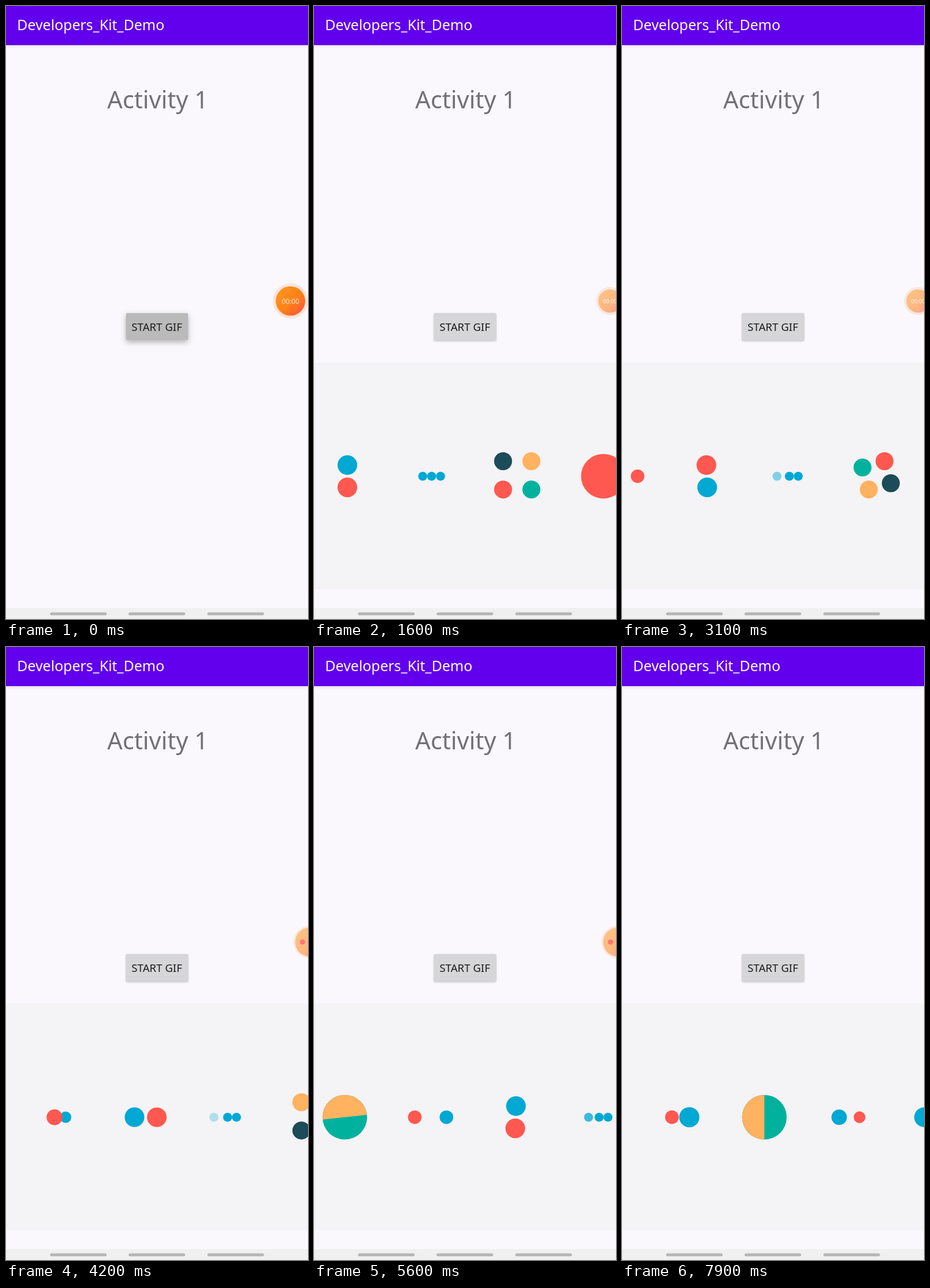
An HTML page with a canvas for the animation above (8000 ms loop, 525 by 1066 pixels).

```html
<!DOCTYPE html>
<html lang="en">
<head>
<meta charset="utf-8">
<title>Activity 1</title>
<style>
  html, body { margin: 0; height: 100%; overflow: hidden; background: #faf8fc; }
  canvas { display: block; width: 100vw; height: 100vh; }
</style>
</head>
<body>
<canvas id="stage" width="525" height="1066"></canvas>
<script>
const ctx = document.getElementById('stage').getContext('2d');
const BLUE = '#00a8d3', RED = '#ff5850', GREEN = '#00b29e', DARK = '#1c4b59', ORANGE = '#ffb260';
const LOOP = 8000, STEP = 100, PITCH = 148.5, MID_Y = 817.7;

// Strip offset over time, and orbit angle / pulse phase over loader cycles
const SCROLL = [[400, -35], [500, -35], [1600, 58], [1700, 58], [3100, 147.4],
                [4200, 242.8], [5600, 350.5], [6600, 430.5], [7900, 544.5]];
const ORBIT = [[.6, 0], [1.246, -250], [1.97, -540], [2.508, -795], [3.276, -1130]];
const PULSE = [[2.508, 180], [3.276, 417]];

const rad = deg => deg * Math.PI / 180;
const clamp = x => Math.min(1, Math.max(0, x));
const frac = x => x - Math.floor(x);
const smooth = x => { x = clamp(x); return x * x * (3 - 2 * x); };
const easeInOut = (x, power) => x < .5 ? (2 * x) ** power / 2 : 1 - (2 - 2 * x) ** power / 2;
const stepped = (x, power) => Math.floor(x) + easeInOut(frac(x), power);

function along(keys, x) {
  if (x <= keys[0][0]) return keys[0][1];
  for (let i = 1; i < keys.length; i++) {
    const [x0, y0] = keys[i - 1], [x1, y1] = keys[i];
    if (x <= x1) return y0 + (y1 - y0) * (x - x0) / (x1 - x0);
  }
  return keys[keys.length - 1][1];
}

function rect(x, y, w, h, color, radius = 0) {
  ctx.fillStyle = color;
  ctx.beginPath();
  ctx.roundRect(x, y, w, h, radius);
  ctx.fill();
}

function disc(x, y, r, color, alpha = 1) {
  if (alpha <= 0) return;
  ctx.globalAlpha = alpha;
  ctx.fillStyle = color;
  ctx.beginPath();
  ctx.arc(x, y, r, 0, 2 * Math.PI);
  ctx.fill();
  ctx.globalAlpha = 1;
}

function text(str, x, y, size, color) {
  ctx.font = `${size}px "Noto Sans", sans-serif`;
  ctx.fillStyle = color;
  ctx.fillText(str, x, y);
}

// Loaders are drawn around (0, 0); c counts their cycles
function spinningPair(c) {
  const a = rad(-90 - 90 * stepped(4 * (c - .035), 5));
  const x = 19.4 * Math.cos(a), y = 19.4 * Math.sin(a);
  disc(-x, -y, 17.1, RED);
  disc(x, y, 17.1, BLUE);
}

function movingDots(c) {
  const gap = 15.5, u = frac(3 * c);
  disc(-gap - 46 * (1 - u), 0, 7.8, BLUE, 1 - 2.7 * (1 - u));
  disc(gap + 46 * u, 0, 7.8, BLUE, 1 - 2.7 * u);
  disc(-gap * (1 - u), 0, 7.8, BLUE);
  disc(gap * u, 0, 7.8, BLUE);
}

function squareDots(c) {
  const corners = [[-1, -1], [-1, 1], [1, 1], [1, -1]];
  [DARK, RED, GREEN, ORANGE].forEach((color, i) => {
    const p = stepped(4 * c, 4) + i, n = Math.floor(p), f = p - n;
    const from = corners[(n % 4 + 4) % 4], to = corners[((n + 1) % 4 + 4) % 4];
    disc(24.6 * (from[0] + (to[0] - from[0]) * f),
         24.6 * (from[1] + (to[1] - from[1]) * f) - 1.5, 15.6, color);
  });
}

function orbitingPair(c) {
  const phi = rad(along(ORBIT, c));
  [[phi, RED], [phi + Math.PI, BLUE]]
    .sort((p, q) => Math.sin(p[0]) - Math.sin(q[0]))
    .forEach(([a, color]) => {
      const depth = Math.sin(a);
      disc(27.5 * Math.cos(a) * (1 + .11 * depth), 0, 11.8 + 2.1 * depth, color);
    });
}

function flippingDisc(c) {
  const u = frac(c + .07);
  disc(0, 0, 38.8, GREEN);
  ctx.save();
  ctx.rotate(rad(-90 * (smooth(u / .25) + smooth((u - .35) / .15))));
  ctx.scale(1, Math.cos(Math.PI * clamp((u - .5) / .135)));
  ctx.fillStyle = ORANGE;
  ctx.beginPath();
  ctx.arc(0, 0, 38.8, Math.PI, 2 * Math.PI);
  ctx.fill();
  ctx.restore();
}

function pulsingPair(c) {
  const swing = 5 * Math.cos(rad(along(PULSE, c)));
  const red = 14.6 - swing, blue = 14.8 + swing;
  disc(-red - .3, 0, red, RED);
  disc(blue + .5, 0, blue, BLUE);
}

const redDisc = () => disc(0, 0, 38.8, RED);

// Each loader with its small shift from the even pitch
const LOADERS = [[pulsingPair, 0], [flippingDisc, 0], [orbitingPair, .7], [spinningPair, 0],
                 [movingDots, -2], [squareDots, -1.7], [redDisc, -.5]];

function drawStrip(t) {
  rect(0, 620, 525, 394, '#f4f3f5');
  const offset = along(SCROLL, t), cycle = (offset - 58) / PITCH;
  LOADERS.forEach(([draw, shift], i) => {
    const x = offset + (i - 3) * PITCH + shift;
    if (x < -60 || x > 585) return;
    ctx.save();
    ctx.translate(x, MID_Y);
    draw(cycle);
    ctx.restore();
  });
}

function drawButton(t) {
  const release = clamp((t - 100) / 300), shade = v => Math.round(186 + v * release);
  ctx.save();
  ctx.shadowColor = `rgba(0,0,0,${.28 - .04 * release})`;
  ctx.shadowBlur = 10 - 7 * release;
  ctx.shadowOffsetY = 4 - 3 * release;
  rect(208.5, 534, 108, 46.7 + release, `rgb(${shade(28)},${shade(27)},${shade(30)})`, 2.5);
  ctx.restore();
  text('START GIF', 218.3, 565.3, 18.7, '#1c1c1d');
}

function drawBubble(t) {
  if (t >= 7600) return;
  const docked = t >= 3900, small = t >= 400;
  const x = docked ? 528 : small ? 514.5 : 494.5;
  const r = docked ? 25.3 : small ? 20.3 : 25.6;
  const y = 513;
  disc(x, y, r + (docked ? 3 : small ? 4 : 5), '#f9e4dc', docked || small ? .85 : 1);
  const fill = ctx.createLinearGradient(x - r * .7, y - r * .7, x + r * .7, y + r * .7);
  fill.addColorStop(0, '#ff9321');
  fill.addColorStop(.55, '#ff8116');
  fill.addColorStop(1, '#ff5f34');
  if (t >= 1000) disc(x, y, r, '#faf8fc');
  disc(x, y, r, fill, t >= 1000 ? .54 : 1);
  if (docked) disc(515.5, y, 4.6, '#ff7672');
  else if (small) text('00:00', 502.5, 516.5, 9.5, '#fff5ee');
  else text('00:00', 479.5, 517.5, 11.9, '#ffe9d8');
}

function draw(t) {
  rect(0, 0, 525, 1066, '#faf8fc');
  ctx.save();
  ctx.shadowColor = 'rgba(0,0,0,.16)';
  ctx.shadowBlur = 4;
  ctx.shadowOffsetY = 1;
  rect(0, 0, 525, 68, '#6200ee');
  ctx.restore();
  text('Developers_Kit_Demo', 19.3, 42, 25, '#fff');
  text('Activity 1', 176, 178, 41.7, '#737177');
  drawButton(t);
  if (t >= 400) drawStrip(t);
  drawBubble(t);
  rect(0, 1047, 525, 19, '#f0f0f0');
  for (const x of [76.5, 213, 350]) rect(x, 1054.5, 98.5, 5, '#b5b5b5', 2.5);
}

const start = performance.now();
function frame() {
  const t = (performance.now() - start) % LOOP;
  draw(Math.floor(t / STEP) * STEP);
  requestAnimationFrame(frame);
}
frame();
</script>
</body>
</html>
```
